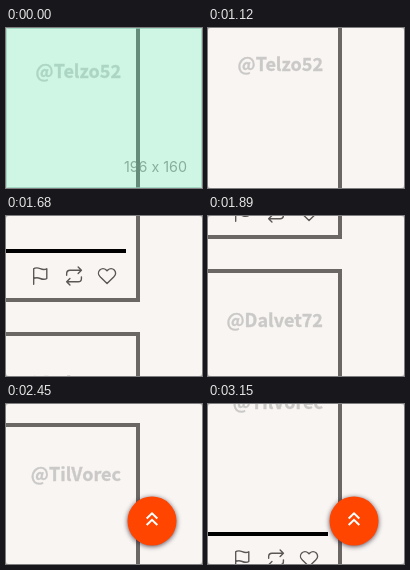
Recreate the animation shown at these times as an HTML page. Size 196 by 160 pixels, loop 5.74 s.

```html
<!DOCTYPE html>
<html lang="en">
<head>
<meta charset="utf-8">
<title>Feed scroll</title>
<style>
  html, body { margin: 0; width: 100%; height: 100%; overflow: hidden; background: #c4c1bf; }
  svg { display: block; width: 100vw; height: 100vh; border-radius: 3px; background: #f8f5f2; }
  .frame { fill: none; stroke: #6a6765; stroke-width: 4; }
  .name { font: bold 18px "Noto Sans CJK JP", "Noto Sans CJK SC", "Noto Sans CJK", "Open Sans", sans-serif; fill: #cac9c8; stroke: #cac9c8; stroke-width: .35; text-anchor: end; }
  .icons { fill: none; stroke: #5a5756; stroke-width: 1.7; stroke-linecap: round; stroke-linejoin: round; }
  .size { font: 14.3px Inter, "Liberation Sans", sans-serif; fill: #6d9583; fill-opacity: .75; text-anchor: end; }
  #top { filter: drop-shadow(0 1px 2.5px rgba(40, 20, 40, .75)); }
</style>
</head>
<body>
<svg viewBox="0 0 196 160" preserveAspectRatio="none">
  <defs>
    <g id="actions" class="icons">
      <g transform="translate(24.4 -9.8) scale(.82)">
        <path d="M4 15s1-1 4-1 5 2 8 2 4-1 4-1V3s-1 1-4 1-5-2-8-2-4 1-4 1zM4 22v-7"/>
      </g>
      <g transform="translate(58.2 -9.8) scale(.82)">
        <path d="M17 1l4 4-4 4M3 11V9a4 4 0 0 1 4-4h14M7 23l-4-4 4-4M21 13v2a4 4 0 0 1-4 4H3"/>
      </g>
      <g transform="translate(91.2 -9.8) scale(.82)">
        <path d="M20.8 4.6a5.5 5.5 0 0 0-7.8 0L12 5.7l-1-1.1a5.5 5.5 0 0 0-7.8 7.8l1 1.1L12 21.2l7.8-7.7 1-1.1a5.5 5.5 0 0 0 0-7.8z"/>
      </g>
    </g>
  </defs>
  <g id="feed"></g>
  <g id="top">
    <circle cx="146" cy="117" r="24.5" fill="#ff4500"/>
    <path d="M140.7 114.5l5.3-5.2 5.3 5.2M140.7 121l5.3-5.2 5.3 5.2" fill="none" stroke="#fff" stroke-width="2"/>
  </g>
  <g id="tint">
    <rect width="196" height="160" fill="#54f5b6" opacity=".25"/>
    <rect x=".5" y=".5" width="195" height="159" fill="none" stroke="#8fcdb4" stroke-opacity=".7"/>
    <text class="size" x="181" y="144">196 x 160</text>
  </g>
</svg>
<script>
const LOOP = 5740, TICK = 70, PITCH = 264;
const names = ["@Telzo52", "@MrVeltic83", "@Dalvet72", "@TilVorec"];

// Scroll offset per tick, beginning at SCROLL_AT
const SCROLL_AT = 16;
const scroll = [
  7, 30, 70, 124, 184, 262, 325, 370, 404,
  430, 450, 467, 482, 503, 537, 582, 631, 672,
  720, 765, 791, 808, 819, 827, 832, 835, 837
];
// Button opacity per tick, beginning at FADE_AT
const FADE_AT = 29;
const fade = [.15, .36, .58, .78, .92, 1];

const $ = id => document.getElementById(id);
const feed = $("feed"), topButton = $("top"), tint = $("tint");

feed.innerHTML = names.map((name, i) => `
  <g transform="translate(0 ${i * PITCH - 6})">
    <rect class="frame" x="-20" y="0" width="152" height="230"/>
    <text class="name" x="115" y="56">${name}</text>
    <rect y="179" width="120" height="4"/>
    <use href="#actions" y="206"/>
  </g>`).join("");

const pick = (list, i) => i < 0 ? 0 : list[Math.min(i, list.length - 1)];

function draw(now) {
  const tick = Math.floor((now % LOOP) / TICK);
  feed.setAttribute("transform", `translate(0 ${-pick(scroll, tick - SCROLL_AT)})`);
  topButton.style.opacity = pick(fade, tick - FADE_AT);
  tint.style.display = tick === 0 ? "" : "none";
}

let start = null;
function loop(now) {
  if (start === null) start = now;
  draw(now - start);
  requestAnimationFrame(loop);
}
draw(0);
requestAnimationFrame(loop);
</script>
</body>
</html>
```
